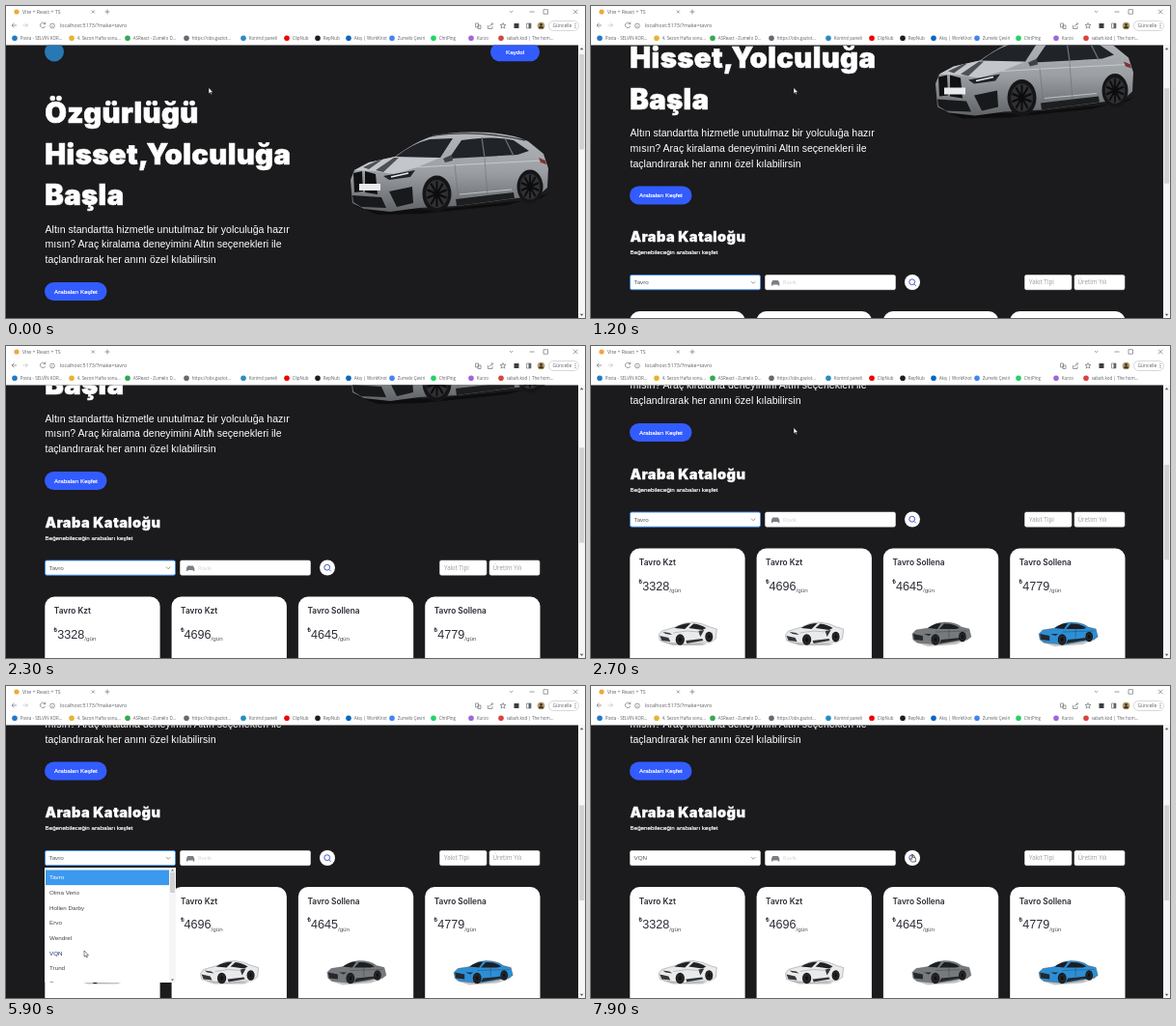
These frames come from a looping animation (600 by 323 pixels, 8 s). An HTML page:

```html
<!DOCTYPE html>
<html lang="tr">
<head>
<meta charset="utf-8">
<title>Vite + React + TS</title>
<style>
html, body { margin: 0; width: 100%; height: 100%; overflow: hidden; background: #1b1a1c; }
svg { display: block; width: 100vw; height: 100vh; }
text { font-family: "Liberation Sans", Arial, sans-serif; font-size: 6.25px; white-space: pre; }
.ui { font-family: "Open Sans", sans-serif; font-size: 4.5px; fill: #5b5f64; }
.hero, .heading { font-family: Inter, sans-serif; font-weight: 900; fill: #fff; stroke: #fff; }
.hero { font-size: 29.3px; letter-spacing: .35px; stroke-width: .6; }
.heading { font-size: 14.6px; letter-spacing: .4px; stroke-width: .3; }
.title { font-family: Inter, sans-serif; font-weight: 600; font-size: 8.3px; fill: #2b2c35; }
.lead { font-size: 10.55px; fill: #fff; }
.strong { fill: #fff; stroke: #fff; stroke-width: .18; }
.line { fill: none; stroke: #6f7378; stroke-width: .7; }
.field { fill: #fff; stroke: #eee; stroke-width: .5; }
.hint { font-family: "Open Sans", sans-serif; fill: #9a9a9f; }
.button { fill: #335cff; }
</style>
</head>
<body>
<svg viewBox="0 0 600 323" preserveAspectRatio="none">
  <defs>
    <clipPath id="view"><path d="M0 40.6H593V323H0z"/></clipPath>
    <clipPath id="listBox"><path d="M40 188H176V307H40z"/></clipPath>
    <linearGradient id="paint" x2="0" y2="1">
      <stop stop-color="#b4b8bc"/><stop offset=".5" stop-color="#9b9fa4"/><stop offset="1" stop-color="#606468"/>
    </linearGradient>
    <g id="wheel">
      <circle r="10" fill="#151517"/><circle r="7.6" fill="#303135"/>
      <path d="M0-7V7M-6.7-2.2 6.7 2.2M-4.1 5.7 4.1-5.7M-4.1-5.7 4.1 5.7M-6.7 2.2 6.7-2.2" stroke="#0c0c0d" stroke-width="1.3"/>
    </g>
    <g id="coupe">
      <path d="M3 20 52 22 58 19 45 24 14 24z" fill="#999" opacity=".6"/>
      <path d="M0 13 3 9 17 5Q25 0 35 0 46 1 53 5L60 7 59 17 54 20 29 23 8 21 1 19z" fill="currentColor" stroke="#888" stroke-width=".5"/>
      <path d="M16 6Q24 1 33 1L27 7zM31 6 36 1.5Q43 2 49 6L45 8z" fill="#202226"/>
      <path d="M1 14 10 16 12 20 3 19zM41 9 47 8 43 15zM4 10 11 11 14 13 7 12zM28 19 45 17 46 19 29 22z" fill="#33363a"/>
      <path d="M15 11 29 9 42 10" fill="none" stroke="#aaa" stroke-width=".7"/>
      <use href="#wheel" transform="translate(22 18) scale(.46 .58)"/>
      <use href="#wheel" transform="translate(52 15) scale(.4 .53)"/>
    </g>
    <g id="sedan">
      <path d="M4 21 55 20 59 18 45 23 16 25z" fill="#999" opacity=".6"/>
      <path d="M0 12 4 8 17 6Q24 0 33 0 45 0 51 5L59 7 61 15 57 18 26 23 5 21 1 18z" fill="currentColor" stroke="#444" stroke-width=".4"/>
      <path d="M16 6Q23 1 30 1L26 7zM28 7 33 1.5Q43 1 49 6L45 7z" fill="#1b1f24"/>
      <path d="M1 12 11 14 11 19 2 18zM12 12 20 12 17 14zM30 18 50 16 50 18 28 22z" fill="#24282d"/>
      <path d="M24 10 57 9M38 2 38 16" fill="none" stroke="#222" stroke-width=".5" opacity=".6"/>
      <use href="#wheel" transform="translate(24 18) scale(.44 .57)"/>
      <use href="#wheel" transform="translate(52 15) scale(.38 .52)"/>
    </g>
    <g id="wagon">
      <path d="M362 207 440 211 552 200 563 194 520 206 432 215 385 216z" fill="#0d0d0e"/>
      <path d="M357 180 361 170 376 162 403 156Q422 142 438 136 462 129 500 131 527 133 541 140L557 153 562 168 561 188 552 196 468 207 428 209 398 213 371 210 359 204z" fill="url(#paint)"/>
      <path d="M361 170 376 162 403 156 450 157 426 167 402 174 382 171z" fill="#c3c6ca"/>
      <path d="M404 156Q422 142 439 138L463 137 450 157zM459 158 472 139Q505 134 526 139L542 150 530 154z" fill="#202328"/>
      <path d="M493 136 496 157M517 137 526 155" stroke="#6d7075" stroke-width="1.3"/>
      <path d="M442 134Q490 128 538 139" fill="none" stroke="#393b3f" stroke-width="1.3"/>
      <path d="M370 167 386 159.500 390 159 376 169zM383 170 402 157 407 157 391 172z" fill="#4d5055"/>
      <path d="M360 173 369 171 370 192 361 193zM372 171 383 174 385 195 372 193z" fill="#101113"/>
      <path d="M391 176 424 170 419 177 397 180z" fill="#202327"/>
      <path d="M399 177 417 173" stroke="#e8edf2" stroke-width="1.3"/>
      <path d="M359 196 389 198 394 209 368 208 360 203zM397 192 421 187 422 204 405 208z" fill="#18191b"/>
      <path d="M366 184H388V191H366z" fill="#e9eaec"/>
      <path d="M426 167 478 164 556 160M470 195 524 190" fill="none" stroke="#d0d2d5" stroke-width=".8"/>
      <path d="M496 158 499 198M465 164 469 202" stroke="#6c6f74" stroke-width=".6" fill="none"/>
      <path d="M466 200 526 193 527 199 467 207z" fill="#1d1e20"/>
      <path d="M453 158 462 154 463 160 455 162z" fill="#404348"/>
      <path d="M552 157 559 160 560 164 554 162z" fill="#7d3434"/>
      <use href="#wheel" transform="translate(446.500 194.500) scale(1.500 1.900)"/>
      <use href="#wheel" transform="translate(543 187) scale(1.350 1.750)"/>
    </g>
  </defs>

  <rect width="600" height="323" fill="#fff"/>
  <g clip-path="url(#view)">
    <rect width="593" height="323" fill="#1b1a1c"/>
    <g id="page">
      <circle cx="50" cy="47.5" r="10" fill="#2878b4"/>
      <rect class="button" x="502" y="38.3" width="51" height="19" rx="9.5"/>
      <text class="strong" x="518" y="50.2">Kaydol</text>
      <text class="hero" x="40.3" y="121">Özgürlüğü</text>
      <text class="hero" x="40.3" y="163.5">Hisset,Yolculuğa</text>
      <text class="hero" x="40.3" y="206">Başla</text>
      <text class="lead" x="40.5" y="234.5">Altın standartta hizmetle unutulmaz bir yolculuğa hazır</text>
      <text class="lead" x="40.5" y="250.3">mısın? Araç kiralama deneyimini Altın seçenekleri ile</text>
      <text class="lead" x="40.5" y="266.1">taçlandırarak her anını özel kılabilirsin</text>
      <rect class="button" x="40" y="286" width="64.5" height="19" rx="9.5"/>
      <text class="strong" x="50" y="297.8">Arabaları Keşfet</text>
      <use href="#wagon"/>
      <text class="heading" x="40.5" y="343.7">Araba Kataloğu</text>
      <text class="strong" x="40.5" y="356.5">Beğenebileceğin arabaları keşfet</text>

      <rect id="select" class="field" x="40.5" y="378" width="135" height="15.2" rx="1.7"/>
      <text id="make" x="44.5" y="387.8" fill="#555"></text>
      <path class="line" d="m166 384.6 2.2 2.2 2.2-2.2"/>
      <rect class="field" x="180.5" y="378" width="135" height="15.2" rx="1.7"/>
      <path d="M187 389V386L188.3 383.5H193.8L195.3 386V389H193.8V388H188.5V389z" fill="#7b7f85"/>
      <text class="hint" x="199" y="387.7" style="fill:#d0d0d3;font-size:5.6px">Rovik</text>
      <circle cx="333" cy="385.5" r="8" fill="#fff"/>
      <path d="M335 387.6 336.7 389.3M335.6 385.2a2.9 2.9 0 1 1-5.8 0a2.9 2.9 0 1 1 5.8 0" fill="none" stroke="#4a58bd"/>
      <rect class="field" x="449.5" y="378" width="48.5" height="15.2" rx="1.7"/>
      <text class="hint" x="454" y="387.8">Yakıt Tipi</text>
      <rect class="field" x="501" y="378" width="52" height="15.2" rx="1.7"/>
      <text class="hint" x="504.5" y="387.8">Üretim Yılı</text>
      <g id="cards"></g>
    </g>
    <g id="list" clip-path="url(#listBox)"></g>
  </g>

  <rect x="593" y="40" width="7" height="283" fill="#f6f6f6"/>
  <path d="M594.8 45.2 596.6 43 598.4 45.2zM594.8 318.8 596.6 321 598.4 318.8z" fill="#606060"/>
  <rect id="thumb" x="594" width="5.2" height="98.5" fill="#d2d2d2"/>

  <g id="chrome">
    <circle cx="11" cy="6" r="2.6" fill="#f0a63a"/>
    <text class="ui" x="17" y="8" style="font-size:5.2px">Vite + React + TS</text>
    <path class="line" d="m88.8 4.5 3 3m0-3-3 3M102.5 6h5M105 3.5v5M522 5l1.6 1.7L525.2 5M542.5 6h5M557 3.7h4.5v4.5H557zM588 3.7l4.5 4.5m0-4.5-4.5 4.5"/>
    <path class="line" d="M11 20.5H6m2.3-2.3L6 20.5l2.3 2.3M40.5 19a2.7 2.7 0 1 0 .2 2.4M40.8 17v2.2h-2.2" transform="translate(0 -.5)"/>
    <path class="line" d="M17.5 20h5m-2.3-2.3 2.3 2.3-2.3 2.3" opacity=".45"/>
    <path class="line" d="M45.6 20.5a2.4 2.4 0 1 0 4.8 0a2.4 2.4 0 1 0-4.8 0M48 20v1.6"/>
    <text class="ui" x="56" y="22.3" style="font-size:5.3px">localhost:5173/?make=tavro</text>
    <path class="line" d="M486.5 18h3v4h-3zM489 20h3v3.5h-3zM499.5 20v3.5h4.5V21M501 21.5q1-3 3.5-3m-1.3-1.5 1.5 1.5-1.5 1.5M515 17.5l.8 2h2.2l-1.7 1.4.7 2.2-2-1.3-2 1.3.7-2.2-1.7-1.4h2.2zM539.5 18h4.5v5h-4.5z"/>
    <rect x="526.5" y="18" width="5" height="5" fill="#3a3d42"/>
    <path d="M541.5 18H544V23H541.5z" fill="#5f6368"/>
    <circle cx="554.5" cy="20.5" r="3.8" fill="#b39a62"/>
    <path d="M552 23.3a2.5 2.5 0 0 1 5 0z" fill="#40342b"/><circle cx="554.5" cy="19.3" r="1.4" fill="#40342b"/>
    <rect x="562.5" y="15.5" width="31" height="10" rx="5" fill="#fff" stroke="#c4c7cc" stroke-width=".7"/>
    <text class="ui" x="566.5" y="22.2" style="font-size:4.9px">Güncelle</text>
    <path d="M590 18.2v.9m0 1v.9m0 1v.9" stroke="#555" stroke-width=".9"/>
    <g id="bookmarks"></g>
  </g>

  <path id="arrow" d="M0 0V6.3L1.5 5 2.5 7.2 3.4 6.8 2.5 4.700H4.5z" fill="#fff" stroke="#111" stroke-width=".5"/>
  <path id="hand" d="M-.6-3.5Q0-4.3.6-3.5V-.5L3-.1Q3.8.2 3.6 1.3L3 4H-.8L-2.8 1.2Q-2.6.2-1.6.9L-.6 1.6z" fill="#fff" stroke="#111" stroke-width=".6"/>
</svg>
<script>
const $ = id => document.getElementById(id);
const LOOP = 8000, STEP = 100;
const BRAND = 'Tavro', PICK = 'VQN';
const MAKES = [BRAND, 'Olma Verio', 'Hollen Darby', 'Ervo', 'Wendrel', PICK, 'Trund', 'Corvenna'];
const ROW = 15.65, LIST_TOP = 190.5;

const BOOKMARKS = [
  [9, '#2479c7', 'Posta - SELVİN KOR...'], [68, '#e5b52e', '4. Sezon Hafta sonu...'],
  [126, '#35a853', 'ASReact - Zumelo D...'], [187, '#666a70', 'https://obs.gaziot...'],
  [246, '#2a8cc4', 'Kontrol paneli'], [291, '#f00000', 'ClipNub'], [323, '#1b1f23', 'RepNub'],
  [355, '#0a66c2', 'Akış | WorkKnot'], [400, '#4285f4', 'Zumelo Çeviri'],
  [443, '#25d366', 'ChitPing'], [482, '#a066d8', 'Kurzo'], [513, '#d8453e', 'sabah.kod | The hom...']
];
$('bookmarks').innerHTML = BOOKMARKS.map(([x, color, label]) =>
  `<circle cx="${x}" cy="33.3" r="2.8" fill="${color}"/><text class="ui" x="${x + 5.7}" y="35">${label}</text>`).join('');

const CARDS = [
  ['Kzt', 3328, 'coupe', '#e9eaeb'], ['Kzt', 4696, 'coupe', '#e9eaeb'],
  ['Sollena', 4645, 'sedan', '#777a7d'], ['Sollena', 4779, 'sedan', '#2c8fd6']
];
$('cards').innerHTML = CARDS.map(([model, price, car, color], i) => `
  <g transform="translate(${40.3 + i * 131.3} 415.5)">
    <rect width="119.3" height="150" rx="10" fill="#fff"/>
    <text class="title" x="9.5" y="17.5">${BRAND} ${model}</text>
    <text x="9.3" y="36" font-weight="bold" fill="#2b2c35">₺</text>
    <text x="13" y="43.2" fill="#2b2c35" style="font-size:12.6px">${price}</text>
    <text x="41" y="45.5" fill="#55565e">/gün</text>
    <use href="#${car}" x="30" y="76.5" color="${color}"/>
  </g>`).join('');

$('list').innerHTML = `
  <rect x="40" y="188" width="136" height="119" fill="#fff"/>
  <rect x="41" y="${LIST_TOP}" width="128" height="${ROW}" fill="#3b99ee"/>
  <rect x="169" y="188" width="7" height="119" fill="#f6f6f6"/>
  <rect x="170" y="193" width="5" height="21" fill="#d2d2d2"/>
  <path d="M171 191.5 172.5 189.7 174 191.5zM171 303.5 172.5 305.3 174 303.5z" fill="#606060"/>` +
  MAKES.map((name, i) => `<text class="item" x="45" y="${LIST_TOP + ROW * i + 9.8}">${name}</text>`).join('');
const items = [...document.querySelectorAll('.item')];

const smooth = k => k * k * (3 - 2 * k);
const linear = k => k;

// Interpolates keys shaped [time, ...values].
function track(keys, t, ease) {
  const i = keys.findIndex(key => key[0] > t);
  if (i < 0) return keys[keys.length - 1].slice(1);
  const a = keys[i - 1], b = keys[i];
  const k = ease((t - a[0]) / (b[0] - a[0]));
  return a.slice(1).map((v, j) => v + (b[j + 1] - v) * k);
}

const SCROLL = [[0, 0], [1200, 99.5], [1900, 120], [2300, 156], [2700, 206], [2900, 207.5]];
const POINTER = [[0, 210, 84.5], [2800, 210, 84.5], [3600, 168, 174.5], [3800, 168, 174.5], [3900, 168.3, 174.5],
  [4600, 168.3, 174.5], [5500, 80.5, 272], [5900, 81, 274], [6600, 81, 274], [7500, 333, 178], [LOOP, 333, 178]];

function draw(now) {
  const t = Math.floor(now % LOOP / STEP) * STEP;
  const [scroll] = track(SCROLL, t, linear);
  const [x, y] = track(POINTER, t, smooth);
  const open = t >= 4000 && t < 6300;
  const focused = t < 7800;
  const onSearch = Math.hypot(x - 333, y - 178) < 8;

  $('page').setAttribute('transform', `translate(0 ${-scroll})`);
  $('thumb').setAttribute('y', 50 + scroll * .354);
  $('make').textContent = t < 6300 ? BRAND : PICK;
  $('select').style.stroke = focused ? '#3f8ff5' : '';
  $('select').style.strokeWidth = focused ? .9 : '';

  $('list').style.display = open ? '' : 'none';
  const hovered = Math.floor((y - LIST_TOP) / ROW);
  items.forEach((item, i) => item.setAttribute('fill', i === 0 ? '#fff' : i === hovered ? '#1c2f70' : '#444'));

  for (const id of ['arrow', 'hand']) {
    $(id).setAttribute('transform', `translate(${x} ${y})`);
    $(id).style.display = (id === 'hand') === onSearch ? '' : 'none';
  }
}

const start = performance.now();
function tick() {
  draw(performance.now() - start);
  requestAnimationFrame(tick);
}
tick();
</script>
</body>
</html>
```
